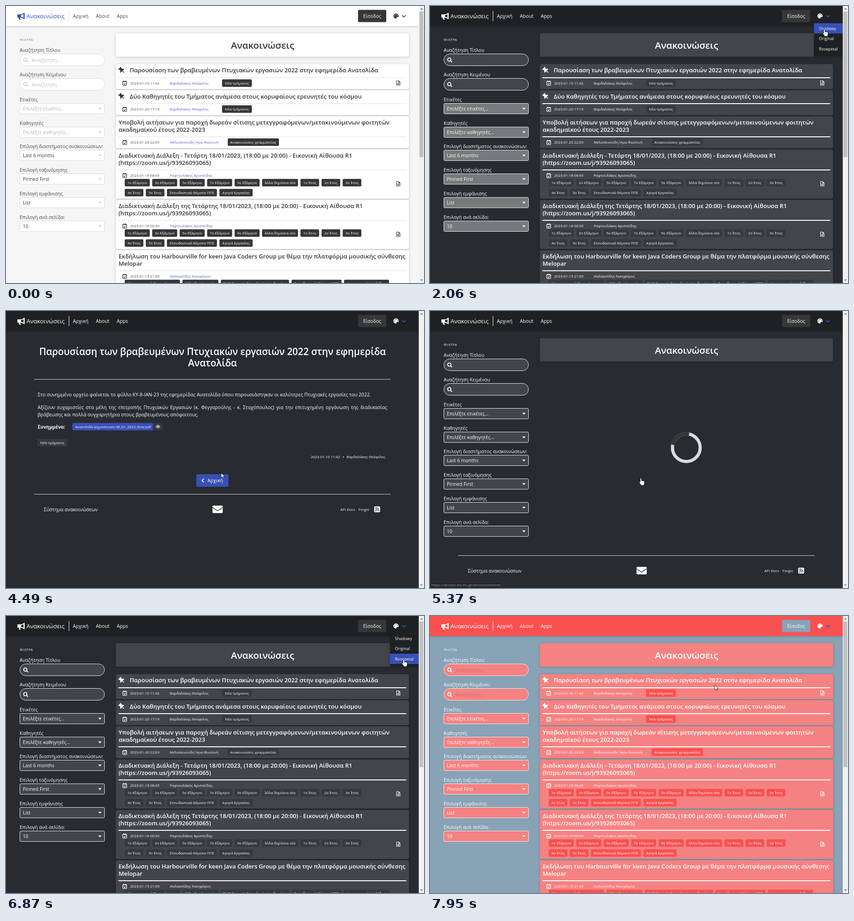
Recreate the animation shown at these times as an HTML page. Size 919 by 610 pixels, loop 8 s.

```html
<!DOCTYPE html>
<html lang="el">
<head>
<meta charset="utf-8">
<title>Ανακοινώσεις</title>
<style>
html, body { margin: 0; width: 100%; height: 100%; overflow: hidden; }
svg { display: block; width: 100vw; height: 100vh; background: var(--bg);
  font-family: "Open Sans", "Noto Sans", sans-serif; }
text { white-space: pre; }
.light { --bg: #f5f5f5; --nav: #fff; --card: #fff; --ink: #4a4a4a; --title: #363636; --dim: #7a7a7a;
  --brand: #3850b7; --link: #485fc7; --sep: #ddd; --line: #efefef; --icon: #363636; --tag: #363636;
  --btn: #363636; --edge: #dbdbdb; --glyph: #d3d3d3; --hint: #bdbdbd; --pick: #b5b5b5; --menu: #fff; --hover: #f5f5f5; }
.dark, .pink { --ink: #fff; --title: #fff; --dim: #fff; --brand: #fff; --link: #fff; --sep: #fff; --line: #fff;
  --icon: #fff; --edge: #f0f0f0; --glyph: #fff; --pick: #fff; font-weight: 450; }
.dark { --bg: #282b30; --nav: #1e2124; --card: #424549; --tag: #36393e; --btn: #36373a; --hint: #424549;
  --menu: #1e2124; --hover: #3850b7; --old: #fff; }
.pink { --bg: #88a2b6; --nav: #f95050; --card: #f58282; --tag: #f95050; --btn: #88a2b6; --hint: #c96c6c;
  --menu: #f95050; --hover: #88a2b6; --old: #424549; }
.shade { filter: drop-shadow(0 1.5px 2.5px #0003); }
.small { font-weight: 500; }
.justify { font-size: 10.5px; line-height: 16px; color: #fff; white-space: nowrap; text-align: justify; text-align-last: justify; }
</style>
</head>
<body>
<svg id="stage" class="light" viewBox="0 0 919 610" preserveAspectRatio="none"></svg>
<script>
const LOOP = 8000, MID = 'text-anchor="middle"', BLUE = '#3850b7';
const color = c => c[0] === '#' || c === 'none' ? c : `var(--${c})`;

// y is the middle of the capitals; baselines sit on whole pixels
const text = (x, y, s, size = 10.5, fill = 'ink', more = '') =>
  `<text x="${x}" y="${Math.round(y + size * .357)}" font-size="${size}" style="fill:${color(fill)}" ` +
  `${size < 9 ? 'class="small"' : ''} ${more}>${s}</text>`;
const box = (x, y, w, h, r, fill, edge = 'none', more = '') =>
  `<rect x="${x}" y="${y}" width="${w}" height="${h}" rx="${r}" style="fill:${color(fill)};stroke:${color(edge)}" ${more}/>`;
const shape = (d, fill, more = '') => `<path d="${d}" style="fill:${color(fill)}" fill-rule="evenodd" ${more}/>`;
const stroke = (d, col, w = 1, more = '') =>
  `<path d="${d}" style="fill:none;stroke:${color(col)}" stroke-width="${w}" ${more}/>`;
const group = (id, s) => `<g id="${id}">${s}</g>`;
const at = (x, y, s) => `<g transform="translate(${x} ${y})">${s}</g>`;
const bold = 'font-weight="600" ';

const tag = (x, y, w, s) => box(x, y - 8.2, w, 16.4, 2.5, 'tag') + text(x + w / 2, y, s, 8, '#fff', MID);
const tagRow = (x, y, list) => list.map(([w, s]) => {
  const out = tag(x, y, w, s);
  x += w + 5.4;
  return out;
}).join('');

const pin = shape('M-4-7h8v2h-1.4l.5 4q2.6 1 2.6 3.2h-11.4q0-2.2 2.6-3.2l.5-4h-1.4zM-.8 2.4h1.6v4l-.8 1.4-.8-1.4z',
  'icon', 'transform="rotate(-45)"');
const calendar = box(-4.3, -4, 8.6, 8.6, 1, 'none', 'icon', 'stroke-width="1.2"') +
  stroke('M-4.3-3.4h8.6M-2.2-5.4v2M2.2-5.4v2', 'icon', 1.5) + stroke('M-2.2 1l1.6 1.6 3-3.2', 'icon', 1.2);
const sheet = stroke('M-3.8-4.7h4.8l2.8 2.8v6.6h-7.6zM.8-4.7v3h3M-2 .6h4M-2 2.6h4', 'icon', 1.1);
const search = stroke('M46 118a3.6 3.6 0 1 1-7.2 0a3.6 3.6 0 1 1 7.2 0M45 120.6l3.4 3.2', 'glyph', 1.9);
const eye = stroke('M-4.5 0q4.5-6 9 0q-4.5 6-9 0z', '#fff', 1.1) + '<circle r="1.6" fill="#fff"/>';

function item(y, h, titles, date, author, tags, opt = {}) {
  const low = titles.length > 1 ? 15.5 : 0, meta = y + 42 + low;
  return box(241.5, y, 644.5, h, 4, 'card', 'none', 'class="shade"') +
    (opt.pin ? at(254.5, y + 13.5, pin) : '') +
    titles.map((s, i) => text(opt.pin ? 272 : 247.5, y + 13.8 + i * 15.7, s, 13.03, 'title', bold)).join('') +
    stroke(`M247 ${Math.floor(y + 30 + low)}H880`, 'line', 1.8) +
    at(261, meta, calendar) + text(273, meta, date, 8) + text(360, meta, author, 8, 'link') +
    (opt.sheet ? at(862.5, y + opt.sheet, sheet) : '') + tags;
}

const head = 'Παρουσίαση των βραβευμένων Πτυχιακών εργασιών 2022 στην εφημερίδα';
const chief = 'Βαρδαλάκης Θεόφιλος', speaker = 'Ραφτουλάκος Αριστείδης';
const room = '(https://zoom.us/j/93926093065)';
const news = y => tag(475, y, 65.5, 'Νέα τμήματος');
const lectureTags = y =>
  tagRow(261, y, [...[1, 3, 5, 7, 9].map(n => [55, n + 'ο Εξάμηνο']), [79, 'Άλλα δημόσια νέα'],
    ...[1, 2, 3].map(n => [41, n + 'ο Έτος'])]) +
  tagRow(261, y + 22, [[41, '4ο Έτος'], [41, '5ο Έτος'], [110, 'Σπουδαστικά Θέματα ΠΠΣ'], [73, 'Αγορά Εργασίας']]);

const items =
  item(128, 55, [head + ' Ανατολίδα'], '2023-01-10 11:42', chief, news(169.7), { pin: 1, sheet: 41.5 }) +
  item(185.5, 55, ['Δύο Καθηγητές του Τμήματος ανάμεσα στους κορυφαίους ερευνητές του κόσμου'],
    '2023-01-20 17:19', chief, news(227), { pin: 1 }) +
  item(243, 70, ['Υποβολή αιτήσεων για παροχή δωρεάν σίτισης μετεγγραφόμενων/μετακινούμενων φοιτητών',
    'ακαδημαϊκού έτους 2022-2023'], '2023-01-20 22:03', 'Μελισσινούδη Ήρα-Φωτεινή',
    tag(487.5, 299.7, 112.5, 'Ανακοινώσεις γραμματείας')) +
  item(316, 108, ['Διαδικτυακή Διάλεξη - Τετάρτη 18/01/2023, (18:00 με 20:00) - Εικονική Αίθουσα R1', room],
    '2023-01-18 08:45', speaker, lectureTags(389), { sheet: 75.5 }) +
  item(427, 108, ['Διαδικτυακή Διάλεξη της Τετάρτης 18/01/2023, (18:00 με 20:00) - Εικονική Αίθουσα R1', room],
    '2023-01-16 00:30', speaker, lectureTags(500), { sheet: 75.5 }) +
  item(538, 108, ['Εκδήλωση του Harbourville for keen Java Coders Group με θέμα την πλατφόρμα μουσικής σύνθεσης',
    'Melopar'], '2023-01-15 21:09', 'Θαλασσίδης Νικηφόρος',
    tagRow(261, 611, [[121.5, 'Μεταπτυχιακά Προγράμματα'], [79, 'Άλλα δημόσια νέα'],
      [150, 'ΠΜΣ Ευφυείς Τεχνολογίες Διαδικτύου'], [110, 'Σπουδαστικά Θέματα ΠΠΣ'], [99, 'Διαγωνισμοί, Διαλέξεις']]));

const fields = [['Ετικέτες', 'Επιλέξτε ετικέτες...', 'pick'], ['Καθηγητές', 'Επιλέξτε καθηγητές...', 'pick'],
  ['Επιλογή διαστήματος ανακοινώσεων:', 'Last 6 months'], ['Επιλογή ταξινόμησης', 'Pinned First'],
  ['Επιλογή εμφάνισης', 'List'], ['Επιλογή ανά σελίδα:', '10']];
const sidebar = text(30, 74.5, 'ΦΙΛΤΡΑ', 7.7, 'dim', 'letter-spacing=".7"') +
  ['Αναζήτηση Τίτλου', 'Αναζήτηση Κειμένου'].map((s, i) => at(0, i * 54,
    text(30, 97, s) + box(30.5, 105.5, 186, 26, 13, 'card', 'edge') + search +
    text(57, 119, 'Αναζήτηση...', 10.5, 'hint'))).join('') +
  fields.map(([label, value, fill = 'title'], i) => at(0, Math.round(i * 51.7),
    text(30, 206.2, label) + box(30.5, 214.5, 186, 23, 2.5, 'card', 'edge') +
    box(31, 215, 185, 22, 2, 'old', 'none', 'class="fade"') +
    text(37, 226.4, value, 10.5, fill) + shape('M202.8 224.2h7.4l-3.7 4z', 'glyph'))).join('');

const list = sidebar + box(241.5, 60, 644.5, 51.5, 4, 'card', 'none', 'class="shade"') +
  text(564, 87, 'Ανακοινώσεις', 20.5, 'title', bold + MID);

const spinner = at(563.5, 301, '<circle r="30.5" fill="none" stroke="#dbdbdb" stroke-width="7"/>' +
  '<circle id="arc" r="30.5" fill="none" stroke="#363636" stroke-width="7" pathLength="100" stroke-dasharray="25 75"/>');

const footer = stroke('M62 403.5H846', '#d8d8d8') + text(83, 437.5, 'Σύστημα ανακοινώσεων') +
  box(454, 428.5, 22.5, 16.5, 2, '#fff') + stroke('M454 432.5l9.6 6.6q1.6 1 3.2 0l9.6-6.6', 'bg', 1.3) +
  text(735, 437.5, 'API Docs', 8) + text(775, 437.5, 'Forgio', 8) +
  box(809.5, 430.3, 13, 13, 2, '#fff') + '<circle cx="812.9" cy="440" r="1.2" style="fill:var(--bg)"/>' +
  stroke('M811.8 436q5 0 5 5M811.8 432.8q8.2 0 8.2 8.2', 'bg', 1.3);

const detail = text(454, 90, head, 20.85, 'title', bold + MID) + text(454, 114.5, 'Ανατολίδα', 20.85, 'title', bold + MID) +
  stroke('M62 150.5H846', '#d8d8d8') +
  text(69.5, 184, 'Στο συνημμένο αρχείο φαίνεται το φύλλο ΚΥ-8-ΙΑΝ-23 της εφημερίδας Ανατολίδα όπου παρουσιάστηκαν οι καλύτερες Πτυχιακές εργασίες του 2022.', 10.55) +
  '<foreignObject x="69.5" y="203.5" width="768.5" height="16"><div class="justify">Αξίζουν ευχαριστίες στα μέλη της επιτροπής Πτυχιακών Εργασιών (κ. Φεγγαρούλης - κ. Σταχόπουλος) για την επιτυχημένη οργάνωση της διαδικασίας</div></foreignObject>' +
  text(69.5, 227.8, 'βράβευσης και πολλά συγχαρητήρια στους βραβευμένους απόφοιτους.', 10.55) +
  text(69.5, 255, 'Συνημμένα:', 10.3, 'ink', 'font-weight="700"') +
  box(323, 246.5, 22, 16.4, 2.5, 'btn') + box(146, 246.5, 177, 16.4, 2.5, BLUE) +
  text(152, 254.7, 'Ανατολιδα Δημοσίευση 08_01_2023_final.pdf', 8) + at(334, 254.5, eye) +
  tag(69.5, 290.3, 65, 'Νέα τμήματος') +
  text(670, 321.3, '2023-01-10 11:42', 8) + '<circle cx="741.5" cy="321.5" r="1.1" fill="#fff"/>' + text(749, 321.3, chief, 8) +
  box(418.5, 359.5, 70.5, 27.5, 2.5, BLUE, 'none', 'id="back"') +
  stroke('M435 369.3l-4 4 4 4', '#fff', 1.9) + text(443, 373.3, 'Αρχική');

const navbar = box(0, 0, 908, 44, 0, 'nav', 'none', 'class="shade"') +
  shape('M26 18.5h6q4 0 8-3.5h1v14h-1q-4-3.5-8-3.5h-6q-1 0-1-1v-5q0-1 1-1zM33 20.3q3-.5 5.5-2v7.4q-2.5-1.5-5.5-2zM27.5 25.5h3.5l1.5 4.5h-3.5z', 'brand') +
  text(45, 22.3, 'Ανακοινώσεις', 13, 'brand') + stroke('M138.5 11V33', 'sep') +
  text(147, 22, 'Αρχική') + text(197.5, 22, 'About', 10.6) + text(243.5, 22, 'Apps', 10.6) +
  box(774, 8.5, 62, 27, 2.5, 'btn') + text(805, 22, 'Είσοδος', 10.5, '#fff', MID) +
  shape('M857.5 16.2a5.8 5.8 0 1 0 0 11.6q1.6-.3.9-1.9q-.3-1.7 1.5-1.7h2q1.5-.2 1.4-2.2a5.8 5.8 0 0 0-5.8-5.8z', 'icon') +
  [[854.4, 22.3], [855.6, 19.3], [858.7, 18.4], [861, 20.7]].map(([x, y]) =>
    `<circle cx="${x}" cy="${y}" r=".9" style="fill:var(--nav)"/>`).join('') +
  stroke('M870.7 20.3l4 4 4-4', BLUE, 1.9);

const menu = box(844, 33, 64, 78, 2.5, 'menu', 'none', 'class="shade"') +
  box(844, 38, 63.5, 22.5, 0, 'hover', 'none', 'id="hover"') +
  ['Shadowy', 'Original', 'Rosepetal'].map((s, i) => text(855, 49.5 + i * 22.5, s, 9)).join('');

const scrollbar = box(907.5, 0, 11.5, 610, 0, '#f1f1f1') + shape('M913.5 4l3 4h-6zM913.5 606l3-4h-6z', '#8a8a8a') +
  box(909, 12, 8.5, 321, 0, '#c1c1c1', 'none', 'id="thumb"');

const status = box(-1, 597, 157, 14, 2, '#1f2124', '#3c3f43', 'id="bar"') + text(3, 603.5, '', 7.9, '#e8e8e8', 'id="url"');

const outline = 'fill="#fff" stroke="#000" stroke-width=".8" stroke-linejoin="round"';
const cursor =
  `<path id="hand" ${outline} d="M0 0q1.5 0 1.5 1.5v4l5 1q1.7.4 1.7 2.2v2.5q0 2-1.2 3.2v1.6h-6.8v-1.6l-3.8-4.8q-.5-1.5 1-1.6l1.2 1.2v-7.7q0-1.5 1.4-1.5z"/>` +
  `<path id="arrow" ${outline} d="M0 0v11l2.6-2.4 1.8 4 1.8-.8-1.8-3.9h3.5z"/>`;

const stage = document.getElementById('stage');
stage.innerHTML = group('list', list) + group('items', items) + group('spinner', spinner) + group('detail', detail) +
  group('footer', footer) + navbar + group('menu', menu) + scrollbar + group('status', status) + group('cursor', cursor);
const $ = id => document.getElementById(id);
const fades = [...document.querySelectorAll('.fade')];
const show = (id, on) => { $(id).style.display = on ? '' : 'none'; };

// time, x, y, cursor kind until the next stop
const path = [
  [570, 914, 40, 'arrow'], [700, 897, 32, 'arrow'], [840, 878, 26, 'hand'], [1450, 878, 26, 'hand'],
  [1720, 867, 51, 'hand'], [2390, 867, 51, 'hand'], [2560, 842, 64, 'arrow'], [3060, 729.5, 136.5, 'hand'],
  [3480, 729.5, 136.5, 'arrow'], [3930, 729.5, 136.5, 'arrow'], [4490, 473, 356.5, 'arrow'],
  [4690, 463.5, 366, 'arrow'], [4760, 463.5, 368, 'hand'], [5440, 463.5, 368, 'arrow'],
  [5980, 870, 27, 'hand'], [6380, 870, 27, 'hand'], [6870, 874, 95.5, 'hand'], [7140, 874, 95.5, 'hand'],
  [7330, 842, 106, 'arrow'], [7880, 626, 162, 'arrow'], [7950, 626, 152, 'arrow'], [8000, 626, 152, 'arrow']];

const ramp = (t, a, b) => Math.min(1, Math.max(0, (t - a) / (b - a)));
const pulse = (t, a, b, c, d) => ramp(t, a, b) * (1 - ramp(t, c, d));

function pointer(t) {
  const i = path.findIndex(k => k[0] > t), [t0, x0, y0, kind] = path[i - 1], [t1, x1, y1] = path[i];
  const p = ramp(t, t0, t1), e = p * p * (3 - 2 * p);
  return [x0 + (x1 - x0) * e, y0 + (y1 - y0) * e, kind];
}

function draw(t) {
  const since = t < 7140 ? 1920 : 7140;
  stage.setAttribute('class', t < 1920 ? 'light' : t < 7140 ? 'dark' : 'pink');
  const left = t < 1920 ? 0 : (1 - ramp(t, since, since + 300)) ** 2;
  fades.forEach(f => { f.style.opacity = left; });

  const inDetail = t >= 3480 && t < 5240, loading = t >= 5240 && t < 5640;
  show('list', !inDetail);
  show('items', !inDetail && !loading);
  show('thumb', !inDetail && !loading);
  show('spinner', loading);
  show('detail', inDetail);
  show('footer', inDetail || loading);
  $('footer').setAttribute('transform', `translate(0 ${loading ? 135 : 0})`);
  $('arc').setAttribute('transform', `rotate(${191 + (t - 5370) * .72})`);
  $('thumb').style.fill = t >= 570 && t < 700 ? '#a8a8a8' : '#c1c1c1';
  $('back').style.fill = t >= 4760 ? '#334aa8' : BLUE;

  show('cursor', t >= 570);
  if (t >= 570) {
    const [x, y, kind] = pointer(t);
    $('cursor').setAttribute('transform', `translate(${x} ${y})`);
    show('hand', kind === 'hand');
    show('arrow', kind === 'arrow');
    const row = Math.floor((y - 38) / 22.5);
    show('hover', row >= 0 && row < 3 && x >= 844);
    $('hover').setAttribute('y', 38 + row * 22.5);
  }
  $('menu').style.opacity = t < 4000 ? pulse(t, 880, 980, 2560, 2660) : pulse(t, 5990, 6050, 7330, 7430);

  const first = t < 4000;
  $('url').textContent = 'https://aboard.iee.ihu.gr/announcements' + (first ? '/61820' : '');
  $('bar').setAttribute('width', first ? 182 : 157);
  $('status').style.opacity = first ? pulse(t, 3100, 3210, 3540, 3740) : pulse(t, 4770, 4970, 5290, 5490);
}

function tick() {
  draw(performance.now() % LOOP);
  requestAnimationFrame(tick);
}
tick();
</script>
</body>
</html>
```
